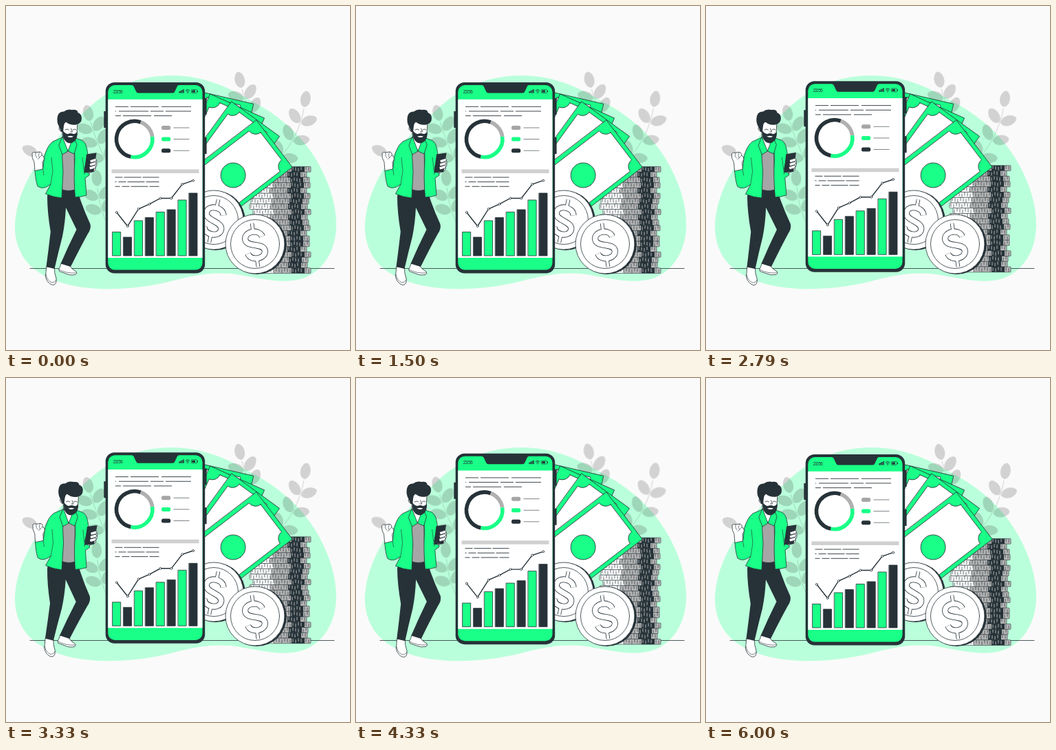
Animation of 500 by 500 pixels, one loop 6.04 s. Source, as an HTML page:

```html
<!DOCTYPE html>
<html lang="en">
<head>
<meta charset="utf-8">
<title>Finance growth</title>
<style>
html, body { margin: 0; width: 100%; height: 100%; overflow: hidden; background: #fafafa; }
svg { display: block; width: 100vw; height: 100vh; }
.ink { fill: #263238; }
.green { fill: #19ff87; }
.white { fill: #fff; }
.gray { fill: #a6a6a6; }
.line { stroke: #263238; stroke-width: .8; stroke-linejoin: round; stroke-linecap: round; }
.thin { stroke: #263238; stroke-width: .6; fill: none; }
.stem { fill: none; stroke: #333; }
.leaf { fill: #333; }
.clock { font: 6.8px "Liberation Sans", Arial, sans-serif; letter-spacing: -.75px; }
.sign path { fill: none; stroke: #263238; stroke-width: 9; }
.sign .bar { stroke-width: 5.5; }
.sign .in { stroke: #fff; stroke-width: 7.4; }
.sign .bar.in { stroke-width: 3.9; }
</style>
</head>
<body>
<svg viewBox="0 0 500 500">
  <path fill="#baffdb" d="M13 322C13 294 24 262 42 234C60 204 88 178 118 150C150 120 190 101 240 101C285 101 322 117 355 137C396 158 428 186 450 222C470 255 480 288 480 318C480 352 464 383 434 395C405 405 375 397 340 391C305 385 275 391 240 400C205 409 170 412 135 411C95 409 58 399 35 377C20 362 13 342 13 322Z"/>
  <g id="plants" opacity=".2"></g>
  <path class="line" d="M35 381.5H477"/>
  <g id="stack"></g>
  <g id="bills"></g>
  <g id="coins"></g>

  <g id="phone">
    <path class="ink" d="M142.3 153h4v24h-4zM288 134h3.6v24H288zM288 191h3.6v24H288z"/>
    <rect class="ink" x="144.7" y="111" width="144.5" height="277.5" rx="13"/>
    <rect class="green" x="148.3" y="115" width="137.2" height="268.6" rx="10"/>
    <path class="white" d="M148.3 135.8H285.5V366H148.3Z"/>
    <path class="ink" d="M182 114H252L249 116.500L245.500 124Q244.500 126.500 242 126.500H192.500Q190 126.500 189 124L185.500 116.500Z"/>
    <text class="clock ink" x="155.700" y="126.800">23:56</text>
    <g id="status"></g>
    <g id="report"></g>
    <path fill="#d0d0d0" d="M153.500 237.500H280.500V243H153.500Z"/>
    <g id="chart"></g>
  </g>

  <g id="man">
    <!-- shoes -->
    <path class="white line" d="M59 379L70.500 380Q70 388 73 396Q74 405 68.500 405.500Q63 405 59 398Q56 393 58 387Z"/>
    <path class="white line" d="M81 373L92 377Q96 383 102 386Q104 389 101 390.500Q93 392 87 389L77.500 385.500Q75.500 383 78 380Z"/>
    <path class="thin" d="M58 390Q60 400 67 402Q71 402 73 398M77 383Q88 389 102 388"/>
    <!-- trousers -->
    <path class="ink" d="M62 266H103L109 284Q115 301 122.500 317Q124 324 119 331Q109 349 94 379L79.500 374.500Q90 350 102.500 325L87 293Q86 315 82 335Q76 358 70.500 382L58.500 379Q62 353 64.800 328Q60 300 60 277Z"/>
    <!-- shirt, neck -->
    <path class="gray line" d="M80 200H99L100 267Q91 270 82 267Z"/>
    <path class="white line" d="M83 188V200L90 210.500L97.500 200V188Z"/>
    <!-- raised hand -->
    <path class="white line" d="M42 240L41 227Q37 221 38 214Q40 211.500 43 213L49 212Q53 213 52 217L55 219Q57 223 53 227L54 240Z"/>
    <path class="thin" d="M43 213Q42 218 45 221M49 212Q46 217 49 221M52 217L46 223"/>
    <!-- jacket with sleeves -->
    <path class="green line" d="M82 191L68 197Q60 203 56 218L53.500 237L42 239.500Q43 254 46 262Q54 268 65 259L57.500 273Q69 278 81 279L83 240Q81 220 82 204Z"/>
    <path class="green line" d="M98 191L110 195Q116 198 117.500 207L120 221L121 246L115 250L117 275Q109 278 100.500 278Q98 250 100 225Q100 208 98 199Z"/>
    <path class="green line" d="M82 190L90 211L82 216L77 203ZM98 190L90 211L99 215L103 202Z"/>
    <path class="thin" d="M65 259L68 240L66 220M53.500 237L55 246M114 245L111 220"/>
    <!-- hand with device -->
    <path class="white line" d="M114 238L119 243L126 241Q131 239 130 235L132 231Q133 226 130 222L122 221L116 229Z"/>
    <path class="ink" d="M117 215.500L131.500 213.500L127.500 241L113.500 242.500Z"/>
    <g id="fingers"></g>
    <!-- head -->
    <path class="white line" d="M81 170L82 188Q86 198 93 198Q101 196 103 187L104 166ZM82 175Q77 173 77 178Q78 183 82 182Z"/>
    <path class="ink" d="M82 180Q86 186 90 186Q94 184 98 186Q102 186 103.500 182Q104.500 193 99 197Q93 202 87 197Q82 192 82 180Z"/>
    <path class="white" d="M89 189.500Q94 188 98 189.500Q94 192.500 89 189.500Z"/>
    <path class="line" fill="none" d="M86 180Q89 177.500 91.500 180M97 180Q99.500 177.500 102 180M94.500 178L96.500 183H93.500"/>
    <path class="ink" d="M80 183L77.500 176Q73 169 75 160Q77 153 84 153.500Q89 149.500 96 151Q104 150 104.500 155Q110 157 110 163Q110 171 102 172.500Q94 174 87 168.500Q84 171 84 174L83 183Z"/>
  </g>
</svg>
<script>
const $ = id => document.getElementById(id);
const fill = (id, html) => { $(id).innerHTML = html; };
const repeat = (n, make) => Array.from({ length: n }, (_, i) => make(i)).join("");
const RAD = Math.PI / 180;

const leaf = (x, y, turn) =>
  `<path class="leaf" transform="translate(${x} ${y}) rotate(${turn})" d="M2 0C4 -6 10 -8 17 -7Q25 -5 26 0Q25 5 17 7C10 8 4 6 2 0Z"/>`;

// curved stem with a leaf on its tip and pairs of leaves below it
function plant(base, bend, tip, pairs) {
  const at = (t, k) => (1 - t) ** 2 * base[k] + 2 * t * (1 - t) * bend[k] + t * t * tip[k];
  const slope = (t, k) => (1 - t) * (bend[k] - base[k]) + t * (tip[k] - bend[k]);
  const leafAt = (t, spread) =>
    leaf(at(t, 0), at(t, 1), Math.atan2(slope(t, 1), slope(t, 0)) / RAD + spread);
  return `<path class="stem" d="M${base}Q${bend} ${tip}"/>` + leafAt(1, 0) +
    repeat(pairs, i => leafAt(.75 - .3 * i, -52) + leafAt(.75 - .3 * i, 52));
}
fill("plants",
  plant([388, 232], [425, 195], [433, 149], 3) +
  plant([372, 190], [350, 150], [343, 121], 2) +
  plant([150, 235], [130, 195], [123, 169], 3) +
  plant([152, 325], [136, 300], [133, 264], 2) +
  plant([70, 255], [62, 225], [47, 217], 0));

// one row of the coin pile, with shaded bands and a milled rim
const ROW = 7.75;
function coinRow(i) {
  const x = 356 + Math.round(Math.sin(i * 2.3 + 2) * 3), y = 233.5 + i * ROW;
  const band = (from, to, color) =>
    `<rect x="${x + from}" y="${y}" width="${to - from}" height="${ROW}" fill="${color}"/>`;
  const ticks = (from, to, color) => repeat(Math.floor((to - from) / 4), k =>
    `<path stroke="${color}" stroke-width=".7" d="M${x + from + 2 + k * 4} ${y + (i + k) % 3}v5"/>`);
  return band(0, 30, "#fff") + band(30, 56, "#b5b5b5") + band(56, 75, "#263238") + band(75, 84, "#b8b8b8") +
    ticks(0, 56, "#263238") + ticks(56, 75, "#eee") + ticks(75, 84, "#263238") +
    `<rect class="thin" x="${x}" y="${y}" width="84" height="${ROW}" rx="1"/>`;
}
fill("stack", repeat(20, coinRow));

// banknote hanging from its top corner
const bill = (x, y, turn) => `<g transform="translate(${x} ${y}) rotate(${turn})">
  <rect class="green line" width="86" height="151"/>
  <path class="white line" d="M18 6H68A12 12 0 0 0 80 18V133A12 12 0 0 0 68 145H18A12 12 0 0 0 6 133V18A12 12 0 0 0 18 6Z"/>
  <circle class="green line" cx="43" cy="75.5" r="18"/></g>`;
fill("bills", bill(276, 123, 13) + bill(297, 128, 24) + bill(328, 139, 36) + bill(364, 166, 52.6));

const curl = "M12 -11C9 -23 -13 -22 -13 -10C-13 2 13 -2 13 10C13 22 -9 23 -12 11";
const bars = "M0 -32V-18M0 18V32";
const disc = (kind, x, y, r) => `<circle class="${kind}" cx="${x}" cy="${y}" r="${r}"/>`;
const coin = (x, y, turn) =>
  disc("ink", x + 2.5, y + .8, 43.3) + disc("white line", x, y, 43) + disc("white line", x, y, 35.5) +
  `<g class="sign" transform="translate(${x} ${y + 1.5}) rotate(${turn})">
  <path class="bar" d="${bars}"/><path d="${curl}"/><path class="bar in" d="${bars}"/><path class="in" d="${curl}"/></g>`;
fill("coins", coin(302, 311, 12) + coin(362, 346, -8));

const box = (kind, x, y, w, h, r = 0) =>
  `<rect class="${kind}" x="${x}" y="${y}" width="${w}" height="${h}" rx="${r}"/>`;

fill("status",
  repeat(4, i => box("ink", 251.3 + 2 * i, 124 - i, 1.5, 2.5 + i)) +
  `<path fill="none" stroke="#263238" d="M261 123Q264 120.2 267 123M262.3 124.8Q264 123.2 265.7 124.8"/>` +
  disc("ink", 264, 126.2, .7) +
  box("thin", 269.3, 121.5, 8.2, 5, 1) + box("ink", 270.3, 122.5, 4.7, 3) + box("ink", 278, 123, 1, 2));

// three rows of unreadable text, broken into words by one dash pattern
const textRows = (x, y, ends, dash) => ends.map((end, i) =>
  `<path stroke="#263238" stroke-width=".9" stroke-dasharray="${dash}" stroke-dashoffset="${i * 62}" d="M${x} ${y + 6.65 * i}H${end}"/>`).join("");

const polar = deg => `${186.7 + 26.2 * Math.cos(deg * RAD)} ${193.5 + 26.2 * Math.sin(deg * RAD)}`;
const arc = (from, to, color) =>
  `<path fill="none" stroke="${color}" stroke-width="5.6" d="M${polar(from)}A26.2 26.2 0 ${to - from > 180 ? 1 : 0} 1 ${polar(to)}"/>`;
const legend = (kind, i) => box(kind, 226, 174 + 16.6 * i, 13.2, 6, 2.5) +
  `<path class="thin" d="M243.5 ${177 + 16.6 * i}h23"/>`;

fill("report",
  textRows(159, 146.3, [269, 269, 241], "19 3 41 4 43 3") +
  textRows(158.5, 249, [222.5, 222.5, 222.5], "11 2 25 2 24 3") +
  arc(-70, -8, "#b0b0b0") + arc(-8, 102, "#19ff87") + arc(102, 290, "#263238") +
  ["gray", "green", "ink"].map(legend).join(""));

const tops = [328.5, 336, 312, 307.5, 299.5, 296, 282, 272];
const trend = [300, 320, 295, 288, 279.5, 279.5, 259, 253.7];
const mid = i => 160.8 + i * 15.9;
fill("chart",
  tops.map((y, i) => box(`${i % 2 ? "ink" : "green"} line`, mid(i) - 5.9, y, 11.8, 363 - y)).join("") +
  `<polyline fill="none" stroke="#263238" stroke-width="1.4" points="${trend.map((y, i) => [mid(i), y]).join(" ")}"/>` +
  trend.map((y, i) => disc("white line", mid(i), y, 1.5)).join(""));

fill("fingers", repeat(3, i =>
  `<path class="white line" d="M${122 - i * .5} ${224 + 5 * i}l8 -2.500q2.500 1.500 .5 4.500l-7.500 2z"/>`));

const LOOP = 6040, CYCLE = 1500;

function draw() {
  const t = performance.now() % LOOP;
  const p = t % CYCLE / CYCLE;
  const lift = -6.1 * (1 - Math.abs(1 - 2 * p));
  const lean = p < .25 ? 4 * p : p < .75 ? 2 - 4 * p : 4 * p - 4;
  // gusts that swell and fade over the loop
  const drift = -1.9 * Math.sin(Math.PI * t / LOOP) * Math.cos(2 * Math.PI * (t - LOOP / 2) / 1300);
  for (const id of ["phone", "stack"]) $(id).setAttribute("transform", `translate(0 ${lift})`);
  $("man").setAttribute("transform", `rotate(${lean} 92 278)`);
  $("plants").setAttribute("transform", `translate(${drift} ${drift * .3})`);
  requestAnimationFrame(draw);
}
draw();
</script>
</body>
</html>
```
